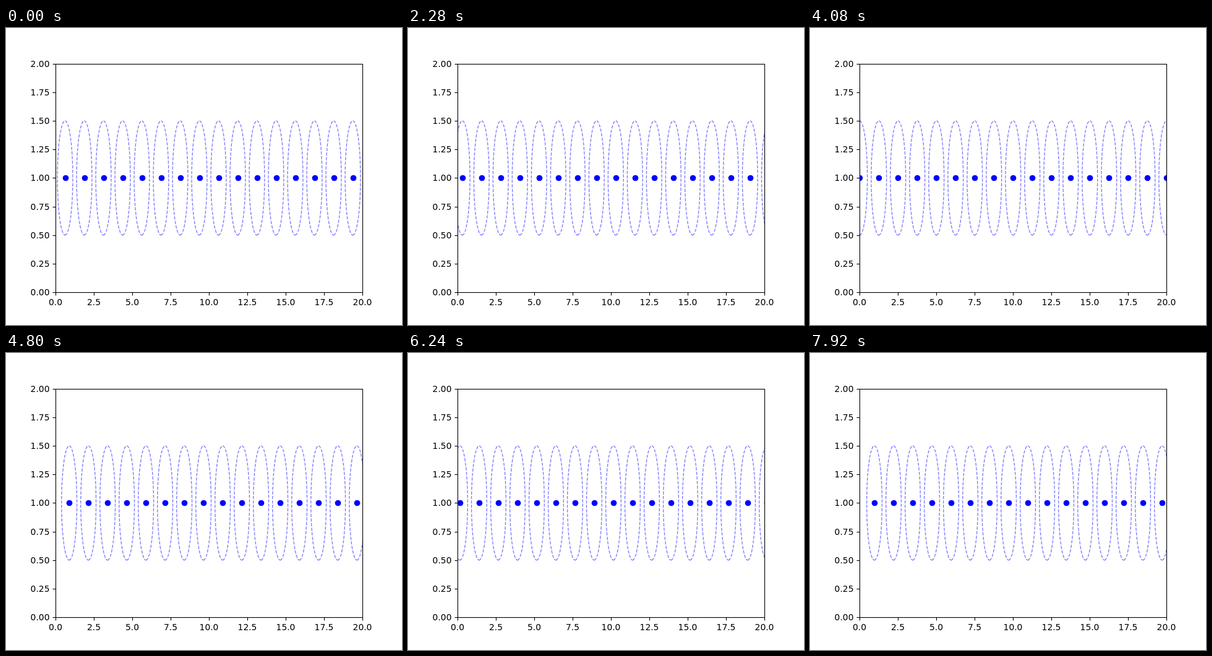
An HTML page with a canvas for the animation above (8000 ms loop, 640 px wide and 480 px high).

```html
<!DOCTYPE html>
<html lang="en">
<head>
<meta charset="utf-8">
<title>Drifting particles</title>
<style>
  html, body { margin: 0; width: 100%; height: 100%; overflow: hidden; background: #fff; }
  canvas { display: block; }
</style>
</head>
<body>
<canvas id="stage" width="640" height="480"></canvas>
<script>
const ctx = document.getElementById('stage').getContext('2d');

const LOOP = 8000, STEP = 120;
const PT = 100 / 72;                       // points to pixels
const LEFT = 80, RIGHT = 576, TOP = 57.6, BOTTOM = 427.2;
const UNIT_X = (RIGHT - LEFT) / 20, UNIT_Y = (BOTTOM - TOP) / 2;
const SPACING = 1.25 * UNIT_X;
const MIDDLE = BOTTOM - UNIT_Y;
const TERMINAL_SPEED = 3.65, LAG = 4.2, DAMPING = 0.808;

const crisp = v => Math.round(v) + 0.5;

function line(x1, y1, x2, y2) {
  ctx.beginPath();
  ctx.moveTo(x1, y1);
  ctx.lineTo(x2, y2);
  ctx.stroke();
}

function drawAxes() {
  ctx.strokeStyle = ctx.fillStyle = '#000';
  ctx.lineWidth = 0.8 * PT;
  const x0 = crisp(LEFT), y0 = crisp(BOTTOM);
  ctx.strokeRect(x0, crisp(TOP), RIGHT - LEFT, y0 - crisp(TOP));

  ctx.font = `${10 * PT}px "DejaVu Sans", sans-serif`;
  for (let i = 0; i <= 8; i++) {
    const x = LEFT + i * 2.5 * UNIT_X, y = BOTTOM - i * 0.25 * UNIT_Y;
    line(crisp(x), y0, crisp(x), y0 + 5);
    line(x0, crisp(y), x0 - 5, crisp(y));
    ctx.textAlign = 'center';
    ctx.fillText((i * 2.5).toFixed(1), x, 448);
    ctx.textAlign = 'right';
    ctx.fillText((i * 0.25).toFixed(2), 70.5, Math.round(y) + 5);
  }
}

function drawRing(x) {
  ctx.beginPath();
  ctx.ellipse(x, MIDDLE, UNIT_X / 2, UNIT_Y / 2, 0, Math.PI / 2, -Math.PI * 3 / 2, true);
  ctx.stroke();
}

function drawDot(x) {
  ctx.beginPath();
  ctx.arc(crisp(x), crisp(MIDDLE), 3.5 * PT, 0, Math.PI * 2);
  ctx.fill();
}

// Particles start at rest and approach a terminal speed against drag.
function travel(step) {
  return TERMINAL_SPEED * (step - LAG * (1 - DAMPING ** step));
}

function drawParticles(step) {
  // A new particle enters at the left edge whenever there is room for it.
  const first = LEFT + (SPACING / 2 + travel(step)) % SPACING;
  const centres = Array.from({ length: 17 }, (_, i) => first + i * SPACING);

  ctx.save();
  ctx.beginPath();
  ctx.rect(LEFT, 57, RIGHT - LEFT, 371);
  ctx.clip();
  ctx.strokeStyle = 'rgba(0, 0, 255, 0.5)';
  ctx.lineWidth = PT;
  ctx.setLineDash([3.7 * PT, 1.6 * PT]);
  centres.forEach(drawRing);
  ctx.fillStyle = '#00f';
  centres.forEach(drawDot);
  ctx.restore();
}

const start = performance.now();

function render() {
  const time = Math.max(0, performance.now() - start) % LOOP;
  ctx.fillStyle = '#fff';
  ctx.fillRect(0, 0, 640, 480);
  drawParticles(Math.floor(time / STEP));
  drawAxes();
  requestAnimationFrame(render);
}

render();
</script>
</body>
</html>
```
